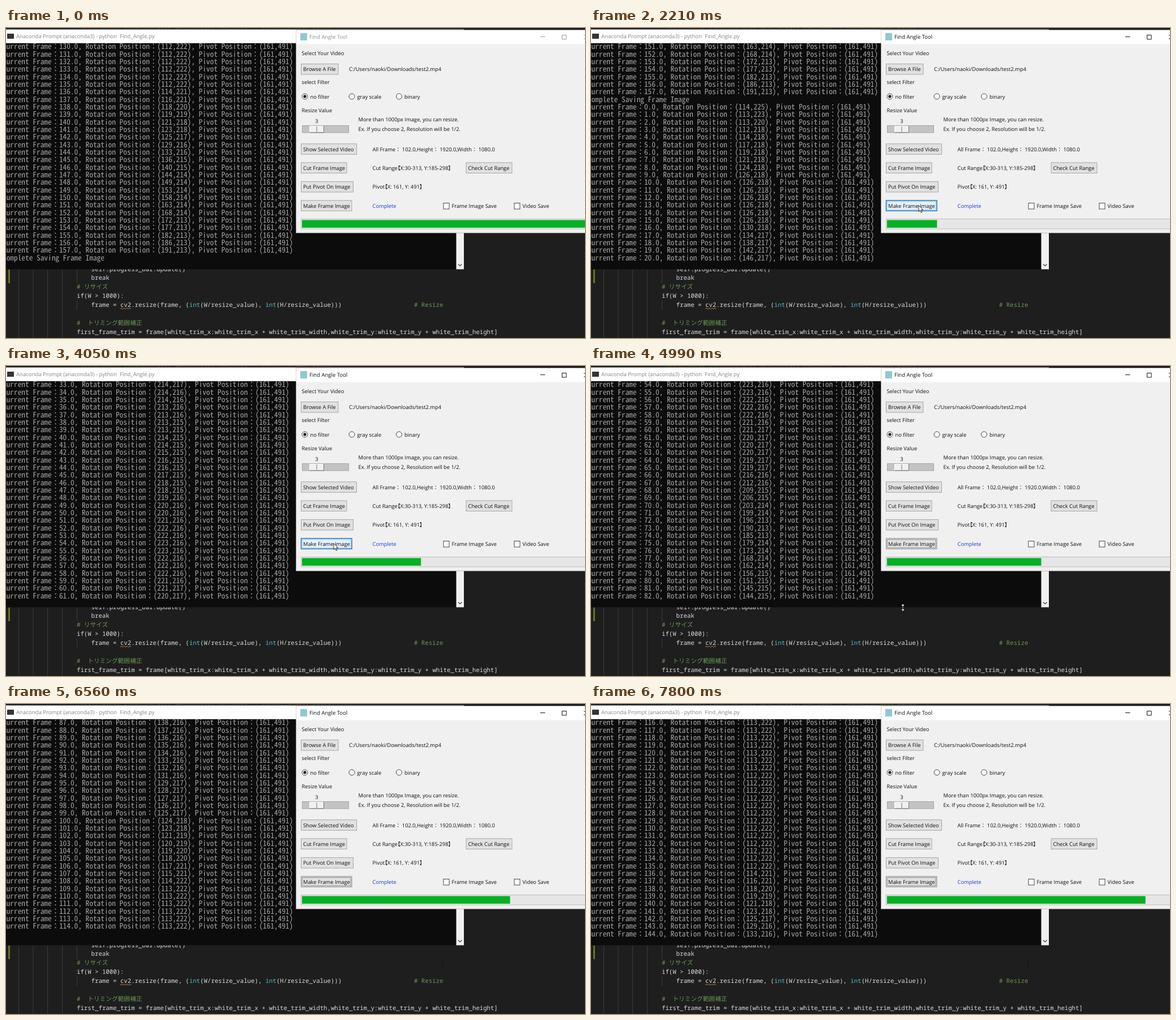
These frames come from a looping animation (1023x548 px, 8000 ms). An HTML page:

```html
<!DOCTYPE html>
<html lang="en">
<head>
<meta charset="utf-8">
<title>Find Angle Tool</title>
<style>
  html, body { margin: 0; width: 100%; height: 100%; overflow: hidden; background: #1e1e1e; }
  svg { display: block; width: 100vw; height: 100vh; }
  text { white-space: pre; text-rendering: geometricPrecision; }
  .ui { font: 9.33px "Open Sans", "Noto Sans CJK JP", sans-serif; fill: #111; }
  .tight { font-feature-settings: "palt"; }
  .code { font: 10.69px "Noto Sans Mono", "Noto Sans CJK JP", monospace; fill: #dcdcdc; }
  .note { fill: #6a9955; }
  .type { fill: #52bccb; }
  .log { font: 300 13.333px "Noto Sans Mono CJK JP", "Noto Sans CJK JP", monospace; fill: #a6a6a6; }
  .btn rect { fill: #e1e1e1; stroke: #a6a6a6; }
  .btn .ring { fill: none; stroke: none; }
  .btn.focus rect { stroke: #8a8a8a; }
  .btn.focus .ring { stroke: #777; stroke-width: .8; }
  .btn.hover rect { fill: #e5f1fb; stroke: #0078d7; stroke-width: 1.4; }
  .btn.hover .ring { stroke: #555; stroke-width: .6; stroke-dasharray: 1 1; }
  .bar { fill: #fff; }
  #tool .cap { fill: #8d8d8d; }
  #tool .ctl { stroke: #9a9a9a; fill: none; }
  #tool.active .cap { fill: #111; }
  #tool.active .ctl { stroke: #111; }
</style>
</head>
<body>
<svg viewBox="0 0 1023 548" preserveAspectRatio="none">
  <rect width="1023" height="548" fill="#1e1e1e"/>

  <!-- editor -->
  <path d="M22.5 427V548M48 427V548M73.500 427V548M99.500 427V548M125.500 427V451M125.500 482V498" stroke="#404040" stroke-width=".9"/>
  <rect x="4" y="427" width="3" height="24" fill="#66731f"/>
  <g class="code">
    <text x="125" y="0.500" class="note" opacity=".4">first_frame, (trim_range), gray_image, bar_size  # binary_angle, pivot</text>
    <text x="150.600" y="429.700">self.progress_bar.update()</text>
    <text x="150.600" y="445.200">break</text>
    <text x="125" y="461.300" class="note"># リサイズ</text>
    <text x="125" y="477.200">if(W &gt; 1000):</text>
    <text x="150.600" y="493">frame = cv2.resize(frame, (<tspan class="type">int</tspan>(W/resize_value), <tspan class="type">int</tspan>(H/resize_value)))</text>
    <text x="721" y="493" class="note"># Resize</text>
    <text x="125" y="524.700" class="note">#  トリミング範囲補正</text>
    <text x="125" y="540.500">first_frame_trim = frame[white_trim_x:white_trim_x + white_trim_width,white_trim_y:white_trim_y + white_trim_height]</text>
  </g>
  <path d="M202 497l2-2 2.500 2 2.500-2 2.500 2 2.500-2 2.500 2 2.500-2 2 2" fill="none" stroke="#c9803a"/>

  <!-- console -->
  <rect y="2.500" width="809" height="424" fill="#0c0c0c"/>
  <rect class="bar" y="2.500" width="809" height="24.300"/>
  <rect x="2" y="10" width="12" height="9" fill="#333"/>
  <text class="ui" x="18" y="18.300" style="font-size:9.600px;fill:#858585">Anaconda Prompt (anaconda3) - python  Find_Angle.py</text>
  <rect x="795.500" y="26" width="13.500" height="400.500" fill="#f0f0f0"/>
  <path d="M799 417.500l3.200 3.200 3.200-3.200" fill="none" stroke="#444" stroke-width="1.300"/>
  <g class="log" id="log"></g>

  <!-- tool window -->
  <g id="tool">
    <rect x="512.500" y="3.500" width="520" height="358.700" fill="#f0f0f0" stroke="#a0a0a0" stroke-width=".6"/>
    <rect class="bar" x="512.700" y="4" width="511" height="24.500"/>
    <rect x="520" y="9" width="12" height="13" fill="#8fc9cf"/>
    <text class="ui cap" x="536" y="19.200" style="font-size:9.500px">Find Angle Tool</text>
    <path class="ctl" d="M944 15.500h8.500M982.500 12.500h7.500v7.500h-7.500zM1021 12l8 8M1021 20l8-8"/>
    <g class="ui" id="labels"></g>
    <g class="ui" id="buttons"></g>
    <g fill="#fff" stroke="#333" stroke-width=".9">
      <circle cx="528" cy="121" r="5"/><circle cx="611" cy="121" r="5"/><circle cx="694.500" cy="121" r="5"/>
      <rect x="773" y="309.500" width="10" height="10.500"/><rect x="898" y="309.500" width="10" height="10.500"/>
    </g>
    <circle cx="528" cy="121" r="2.700" fill="#222"/>
    <rect x="523.500" y="172.500" width="82" height="12.500" fill="#c3c3c3" stroke="#a0a0a0" stroke-width=".9"/>
    <rect x="536.500" y="173.500" width="25" height="11" fill="#f0f0f0"/>
    <path d="M536.500 184.800H561.500V173M549 174v10" fill="none" stroke="#777"/>
    <path d="M536.500 184V173.500H561" fill="none" stroke="#fff"/>
    <rect x="521.500" y="337.500" width="510" height="17.500" fill="#e6e6e6" stroke="#bcbcbc"/>
    <rect id="fill" x="523" y="339.500" height="13.500" fill="#06b025"/>
  </g>

  <!-- pointers -->
  <path id="arrow" d="M0 0V11L2.500 8.700 4.200 12.800 6 12 4.300 8H7.700Z" fill="#fff" stroke="#000" stroke-width=".8"/>
  <path id="sizer" d="M0-6.500L3.300-3H.8V3H3.300L0 6.500-3.300 3H-.8V-3H-3.300Z" fill="#fff" stroke="#000" stroke-width=".7"/>
  <path id="beam" d="M769.800 455.500H774.200M772 455.500V466M769.800 466H774.200" fill="none" stroke="#111" stroke-width=".8"/>
</svg>
<script>
const $ = id => document.getElementById(id);
const LOOP = 8000, ROWS = 29, ROW_HEIGHT = 13.333, FRAMES = 158;
const RUN_START = 1540, STEP = 312.9;

function add(parent, tag, attrs, text) {
  const el = document.createElementNS('http://www.w3.org/2000/svg', tag);
  for (const key in attrs) el.setAttribute(key, attrs[key]);
  if (text) el.textContent = text;
  return parent.appendChild(el);
}

const label = (x, y, text, attrs) => add($('labels'), 'text', { x, y, ...attrs }, text);
label(522.5, 48.3, 'Select Your Video');
label(606, 76, 'C:/Users/naoki/Downloads/test2.mp4');
label(522.5, 98.7, 'select Filter');
label(537.5, 124.5, 'no filter');
label(620.5, 124.5, 'gray scale');
label(704, 124.5, 'binary');
label(522.5, 148.7, 'Resize Value');
label(549, 167.5, '3', { 'text-anchor': 'middle' });
label(622.5, 165.2, 'More than 1000px Image, you can resize.');
label(622.5, 181.8, 'Ex. If you choose 2, Resolution will be 1/2.');
label(647.5, 217.5, 'All Frame： 102.0,Height： 1920.0,Width： 1080.0');
label(647.5, 250.8, 'Cut Range【X:30-313, Y:185-298】', { class: 'tight' });
label(647.5, 284.2, 'Pivot【X: 161, Y: 491】', { class: 'tight' });
label(647.5, 317.5, 'Complete', { style: 'fill:#1c3fd0' });
label(787.5, 318.3, 'Frame Image Save');
label(912.5, 318.3, 'Video Save');

function button(x, y, w, text) {
  const g = add($('buttons'), 'g', { class: 'btn' });
  add(g, 'rect', { x: x + .5, y: y + .5, width: w, height: 18.5 });
  add(g, 'path', { class: 'ring', d: `M${x + 2.5} ${y + 2.5}h${w - 4}v14.500h${4 - w}z` });
  add(g, 'text', { x: x + 4, y: y + 13.2 }, text);
  return g;
}
button(521, 63, 65.5, 'Browse A File');
button(521, 204.3, 98, 'Show Selected Video');
button(521, 237.5, 80.5, 'Cut Frame Image');
button(521, 271, 92, 'Put Pivot On Image');
button(812.5, 237.5, 81, 'Check Cut Range');
const make = button(521, 304.3, 89.5, 'Make Frame Image');

// Linear blend between key points [at, ...values]
function blend(keys, at) {
  const i = Math.max(1, keys.findIndex(k => k[0] >= at));
  const a = keys[i - 1], b = keys[i];
  const p = (at - a[0]) / (b[0] - a[0]);
  return a.slice(1).map((v, j) => Math.round(v + (b[j + 1] - v) * p));
}

// swing of the tracked point: frame, x, y
const swing = [
  [0, 114, 225], [3, 112, 218], [9, 126, 218], [15, 126, 218], [25, 165, 215], [31, 214, 217],
  [39, 213, 215], [54, 223, 216], [65, 219, 217], [72, 196, 213], [81, 145, 215], [99, 125, 217],
  [109, 113, 222], [135, 112, 222], [142, 125, 217], [147, 144, 214], [157, 191, 213]
];
// frames analysed after a number of screen updates
const pace = [[0, 4], [2, 21], [5, 40], [11, 83], [16, 115], [20, 145]];
// updates caught after the line break, with the last row still empty
const breaks = [0, 5, 6, 16];

const run = Array.from({ length: FRAMES }, (_, f) =>
  `Current Frame：${f}.0, Rotation Position：(${blend(swing, f)}), Pivot Position：(161,491)`);
const lines = [...run, 'Complete Saving Frame Image', ...run];
const rows = Array.from({ length: ROWS }, (_, i) =>
  add($('log'), 'text', { x: -6, y: 37.2 + i * ROW_HEIGHT }));

function showLog(step) {
  const idle = step < 0;
  const done = idle ? 0 : blend(pace, step)[0];
  const end = FRAMES + 1 + done + (breaks.includes(step) ? 1 : 0);
  rows.forEach((row, i) => {
    const n = end - ROWS + i;
    row.textContent = n > FRAMES + done ? '' : lines[n];
  });
  $('fill').setAttribute('width', idle ? 500 : 26 + 2.97 * done);
}

const arrowPath = [[0], [310, 717, 316], [610, 591, 335], [930, 579, 313.5], [4680]];
const sizerPath = [[0], [4680, 547, 427], [4990, 551, 427], [5310]];

function place(el, path, t) {
  const [, x, y] = path.filter(p => p[0] <= t).pop();
  el.style.display = x ? '' : 'none';
  if (x) el.setAttribute('transform', `translate(${x} ${y})`);
}

let shown;
function draw(t) {
  const step = Math.max(-1, Math.floor((t - RUN_START) / STEP));
  if (step !== shown) showLog(shown = step);
  $('tool').classList.toggle('active', t >= RUN_START);
  make.setAttribute('class', t < 930 ? 'btn' : t < 4680 ? 'btn hover' : 'btn focus');
  place($('arrow'), arrowPath, t);
  place($('sizer'), sizerPath, t);
  $('beam').style.display = t >= 5310 ? '' : 'none';
}

const start = performance.now();
function tick() {
  draw((performance.now() - start) % LOOP);
  requestAnimationFrame(tick);
}
tick();
</script>
</body>
</html>
```
